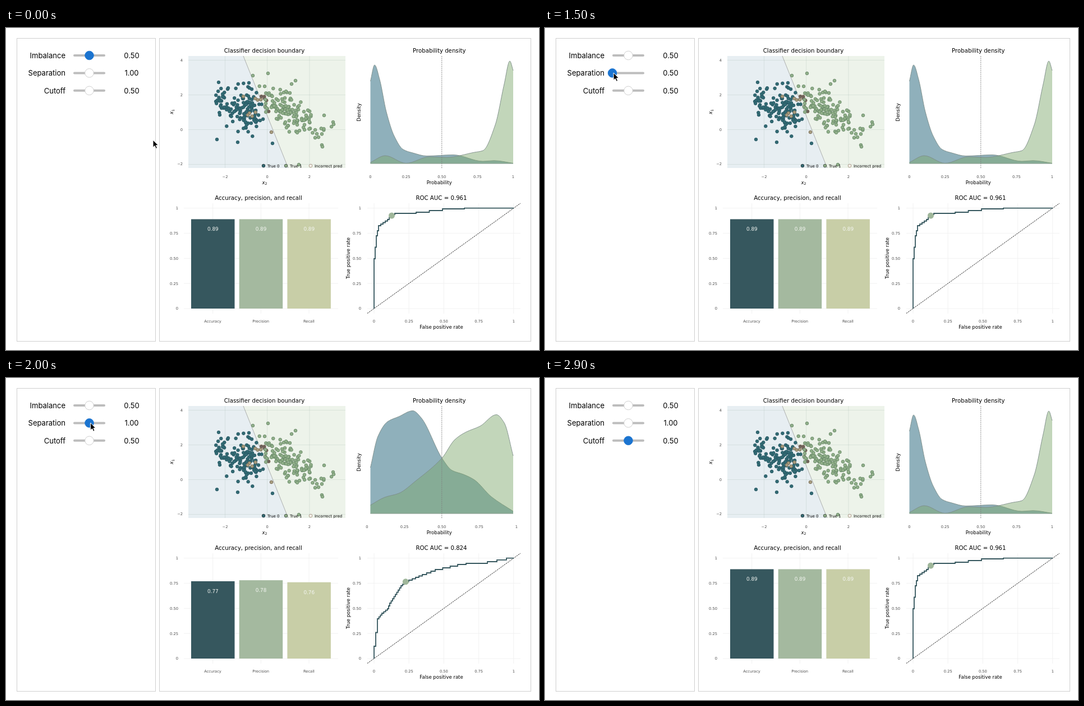
An HTML page that plays this animation: 950 px wide and 575 px high, repeating every 3000 ms.

```html
<!DOCTYPE html>
<html lang="en">
<head>
<meta charset="utf-8">
<title>Classifier explorer</title>
<style>
html, body { margin: 0; width: 100%; height: 100%; overflow: hidden; background: #fff; }
svg { display: block; font-family: "DejaVu Sans", sans-serif; }
.ui { font: 13px Inter, sans-serif; }
.title { font-size: 10.2px; }
.axis { font-size: 8.5px; }
.tick { font-size: 6.7px; fill: #4d4d4d; }
.legend { font-size: 7px; }
.value { font-size: 8.8px; fill: #f4f6f2; }
</style>
</head>
<body>
<svg id="stage" width="950" height="575" viewBox="0 0 950 575"></svg>
<script>
const stage = document.getElementById('stage');

function add(parent, tag, attrs = {}, content) {
  const el = document.createElementNS('http://www.w3.org/2000/svg', tag);
  for (const k in attrs) el.setAttribute(k, attrs[k]);
  if (content !== undefined) el.textContent = content;
  parent.append(el);
  return el;
}
const group = () => add(stage, 'g');
const text = (p, x, y, cls, s, anchor = 'middle') =>
  add(p, 'text', { x, y, class: cls, 'text-anchor': anchor }, s);
const rect = (p, x, y, width, height, fill, stroke = 'none') =>
  add(p, 'rect', { x, y, width, height, fill, stroke });
const path = (p, d, stroke, width = 1, extra = {}) =>
  add(p, 'path', { d, stroke, 'stroke-width': width, fill: 'none', ...extra });
const dot = (p, cx, cy, r, fill, stroke = 'none') =>
  add(p, 'circle', { cx, cy, r, fill, stroke, 'stroke-width': 0.9 });
const pairs = a => a.flatMap((x, i) => i % 2 ? [] : [[x, a[i + 1]]]);
const turned = (x, y, s) =>
  text(stage, 0, 0, 'axis', s).setAttribute('transform', `translate(${x} ${y}) rotate(-90)`);

// Seeded random numbers
let seed = 20;
function rand() {
  seed = (seed + 0x6D2B79F5) | 0;
  let t = Math.imul(seed ^ (seed >>> 15), 1 | seed);
  t = (t + Math.imul(t ^ (t >>> 7), 61 | t)) ^ t;
  return ((t ^ (t >>> 14)) >>> 0) / 4294967296;
}
function gauss2(limit) {
  for (;;) {
    const r = Math.sqrt(-2 * Math.log(1 - rand())), a = rand() * 2 * Math.PI;
    if (r < limit) return [r * Math.cos(a), r * Math.sin(a)];
  }
}
const cloud = (n, cx, cy, ax, ay, bx, by, limit) => Array.from({ length: n }, () => {
  const [u, v] = gauss2(limit);
  return [cx + u * ax + v * bx, cy + u * ay + v * by];
});

rect(stage, 19.5, 18.5, 247, 541, '#fff', '#cfcfcf');
rect(stage, 273.5, 18.5, 662, 541, '#fff', '#cfcfcf');

// Scatter: a few outliers, the rest from seeded clouds
const zeroEdge = pairs([379, 97, 376, 199, 433, 98, 413, 204, 475, 206]);
const zeroFar = pairs([354, 143, 459, 220, 485, 218, 530, 182, 491, 122]);
const oneFew = pairs([461, 87, 434, 152, 473, 186, 509, 100, 516, 94, 506, 116, 520, 141, 540, 163,
  567, 156, 583, 168, 584, 172, 554, 189]);
const oneEdge = pairs([467, 81, 440, 85, 563, 209, 564, 212, 551, 196, 522, 244]);
const oneShared = [...oneFew.slice(1), ...cloud(6, 558, 174, 22, 4, 0, 7, 1.4), ...cloud(9, 486, 141, 14, 4, 0, 9, 1.9)];
const zeroBase = [...zeroEdge, ...cloud(10, 380, 130, 6, 0, 0, 17, 1.6), ...cloud(130, 424, 146, 24, 4, 0, 23, 2.05)];
const zeroMany = [...zeroBase, ...zeroFar, ...cloud(122, 428, 149, 28, 4, 0, 24, 2.1)];
const oneBase = [...oneShared, ...oneEdge, ...cloud(6, 436, 139, 12, 6, 0, 20, 1.4),
  ...cloud(110, 504, 150, 29, 21, -9, 12, 2)];
const moved = (pts, dx, dy) => pts.map(([x, y]) => [x + dx, y + dy]);

function drawScatter(zeros, ones, top, bottom) {
  const g = group();
  const right = (x, y) => x > top + (bottom - top) * (y - 50) / 200;
  rect(g, 325, 50, 280, 200, '#edf3ea');
  path(g, `M325 50H${top}L${bottom} 250H325Z`, 'none', 0, { fill: '#e7eef2' });
  let grid = '';
  for (let i = 0; i < 4; i++) grid += `M325 ${57.5 + i * 62}H605`;
  for (let i = 0; i < 3; i++) grid += `M${390.5 + i * 75.2} 50V250`;
  path(g, grid, '#7f9a8e', 0.8, { opacity: 0.22 });
  path(g, `M${top} 50L${bottom} 250`, '#8c8c8c', 0.9, { 'stroke-dasharray': '1.6 .6' });
  for (const [x, y] of zeros)
    right(x, y) ? dot(g, x, y, 2.8, '#6b625d', '#7d6552') : dot(g, x, y, 2.8, '#316b73', '#2b5866');
  for (const [x, y] of ones)
    right(x, y) ? dot(g, x, y, 2.8, '#91af89', '#688a69') : dot(g, x, y, 2.8, '#a99e80', '#776a55');
  dot(g, 459, 246, 2.8, '#316b73', '#26343a');
  dot(g, 499, 246, 2.8, '#91af89', '#3f4f40');
  dot(g, 543, 246, 2.8, '#fbf8f4', '#a5917c');
  text(g, 466, 248.6, 'legend', 'True 0', 'start');
  text(g, 506, 248.6, 'legend', 'True 1', 'start');
  text(g, 550, 248.6, 'legend', 'Incorrect pred', 'start');
  return g;
}

text(stage, 460.5, 43.8, 'title', 'Classifier decision boundary');
['4', '2', '0', '−2'].forEach((s, i) => text(stage, 315, 60 + i * 61.8, 'tick', s, 'end'));
['−2', '0', '2'].forEach((s, i) => text(stage, 390.5 + i * 75.2, 267.8, 'tick', s));
function variable(x, y, sub, angle) {
  const t = add(stage, 'text', { class: 'axis', 'text-anchor': 'middle', transform: `translate(${x} ${y}) rotate(${angle})` });
  add(t, 'tspan', { 'font-style': 'italic' }, 'x');
  add(t, 'tspan', { dy: 1.6, 'font-size': 6 }, sub);
}
variable(298, 149.5, '1', -90);
variable(461, 278.5, '2', 0);

// Density outlines, joined by a monotone curve
const zeroDens = [649.5, 95, 657, 66, 666, 92, 678, 150, 692, 193, 708, 217, 725, 223, 750, 228.5,
  797, 226.5, 850, 238, 870, 236.8, 904, 241.5];
const oneDens = [649.5, 240, 676, 228, 713, 241.5, 755, 230, 785, 231, 835, 222, 850, 219, 872, 173,
  888, 100, 898, 59, 904, 76];
const zeroSpike = [650, 59, 652.3, 150, 658, 219, 667, 239, 672.5, 234, 679, 240, 904, 241.9];
const oneFlat = [650, 240.5, 710, 238, 790, 239.8, 885, 235, 904, 236];
const zeroWide = [649.5, 160, 663, 104, 680, 78, 700, 69, 725, 58.5, 740, 71, 777, 143, 795, 165,
  815, 172, 835, 182, 865, 212, 904, 238];
const oneWide = [649.5, 227, 675, 213, 700, 206, 730, 184, 777, 143, 800, 110, 820, 96.5, 845, 86,
  874, 65.5, 888, 80, 904, 139];

function smooth(pts) {
  const last = pts.length - 1;
  const chord = i => (pts[i + 1][1] - pts[i][1]) / (pts[i + 1][0] - pts[i][0]);
  const slope = i => {
    if (i === 0) return chord(0);
    if (i === last) return chord(last - 1);
    const a = chord(i - 1), b = chord(i);
    return a * b > 0 ? 2 * a * b / (a + b) : 0;
  };
  let d = 'M' + pts[0];
  for (let i = 1; i <= last; i++) {
    const [x0, y0] = pts[i - 1], [x1, y1] = pts[i], h = (x1 - x0) / 3;
    d += `C${x0 + h} ${y0 + h * slope(i - 1)} ${x1 - h} ${y1 - h * slope(i)} ${x1} ${y1}`;
  }
  return d;
}

const ticks = ['0', '0.25', '0.50', '0.75', '1'];
function drawDensity(zero, one, x0, x1, cutoff) {
  const g = group(), at = v => x0 + (x1 - x0) * v;
  [[zero, 'rgba(33,99,120,.5)'], [one, 'rgba(122,166,105,.46)']].forEach(([list, fill]) => {
    const pts = pairs(list), d = smooth(pts);
    path(g, `${d}V242H${pts[0][0]}Z`, 'none', 0, { fill });
    path(g, d, '#7d8d88', 0.9);
    path(g, `M${pts[0][0]} 242H904`, '#8fa397', 0.7);
  });
  path(g, `M${at(cutoff)} 50V250.5`, '#808080', 0.9, { 'stroke-dasharray': '2.2 1.4' });
  ticks.forEach((s, i) => text(g, at(i / 4), 267.8, 'tick', s));
  return g;
}

text(stage, 772.3, 43.8, 'title', 'Probability density');
text(stage, 772.3, 279.2, 'axis', 'Probability');
turned(631.7, 150.5, 'Density');

// Bars and ROC curve
const level = v => 501 - 179.3 * v;
text(stage, 450, 306.8, 'title', 'Accuracy, precision, and recall');
turned(612.6, 411, 'True positive rate');
text(stage, 776, 537.3, 'axis', 'False positive rate');
ticks.forEach((s, i) => {
  const y = level(i / 4), x = 656 + i * 62.2;
  path(stage, `M317 ${y}H592M644 ${y}H917M${x} 313V510`, '#f1f1f1', 0.9);
  text(stage, 307, y + 2.4, 'tick', s, 'end');
  text(stage, 633, y + 2.4, 'tick', s, 'end');
  text(stage, x, 526, 'tick', s);
});
['Accuracy', 'Precision', 'Recall'].forEach((s, i) => {
  path(stage, `M${368.7 + i * 85.7} 313V510`, '#f1f1f1', 0.9);
  text(stage, 368.5 + i * 85.7, 526, 'tick', s);
});

const rocBase = [656, 412, 660, 371, 664, 353, 680, 342, 686, 335, 693, 331, 731, 329, 778, 323, 817, 321.6];
const rocFew = [656, 408, 661, 365, 663, 352, 668, 340, 676, 334, 697, 328, 765, 321.6];
const rocNear = [656, 479, 662, 430, 670, 420, 680, 412, 684, 402, 704, 371, 712, 363.5, 742, 351,
  765, 342, 805, 333, 820, 331, 858, 328, 892, 321.6];

// Staircase through the points, long stretches split into small steps
function stairs(list) {
  let d = 'M656 501', x = 656, y = 501;
  for (const [nx, ny] of pairs(list)) {
    const n = Math.max(1, Math.round(Math.min(nx - x, y - ny) / 2.6));
    for (let i = 1; i <= n; i++) d += `H${x + (nx - x) * i / n}V${y + (ny - y) * i / n}`;
    x = nx;
    y = ny;
  }
  return d + 'H905';
}

function drawMetrics(values, auc, roc, mx, my) {
  const g = group();
  values.forEach((v, i) => {
    const x = 330 + i * 85.7, y = level(v);
    rect(g, x, y, 77.5, 501 - y, ['#36575e', '#a4b99f', '#c8cea7'][i]);
    text(g, x + 38.8, y + 21, 'value', String(v));
  });
  text(g, 776, 306.8, 'title', 'ROC AUC = ' + auc);
  path(g, 'M644 509.6L917 313', '#111', 0.9, { 'stroke-dasharray': '2.6 1.3' });
  path(g, stairs(roc), '#36575e', 1.8);
  dot(g, mx, my, 5.5, '#9fb69a');
  return g;
}

// Looks of each panel: base, imbalanced, less separated, high cutoff
const scatter = [
  drawScatter(zeroBase, oneBase, 423, 503),
  drawScatter(zeroMany, [oneFew[0], ...oneShared], 453, 544),
  drawScatter(moved(zeroBase, 18.8, 15.5), moved(oneBase, -18.8, 15.5), 415, 500),
  drawScatter(zeroBase, oneBase, 447, 527)
];
const density = [
  drawDensity(zeroDens, oneDens, 649.5, 904, 0.5),
  drawDensity(zeroSpike, oneFlat, 650, 906, 0.5),
  drawDensity(zeroWide, oneWide, 643.5, 910, 0.5),
  drawDensity(zeroDens, oneDens, 649.5, 904, 0.9)
];
const metrics = [
  drawMetrics([0.89, 0.89, 0.89], '0.961', rocBase, 687.5, 335),
  drawMetrics([0.96, 0.9, 0.66], '0.97', rocFew, 667.3, 340.3),
  drawMetrics([0.77, 0.78, 0.76], '0.824', rocNear, 712.3, 363.8),
  drawMetrics([0.86, 0.98, 0.73], '0.961', rocBase, 660.5, 370)
];

// Sliders: name, low end, middle
const sliders = [['Imbalance', 0.1, 0.5], ['Separation', 0.5, 1], ['Cutoff', 0.1, 0.5]].map(([name, low, mid], i) => {
  const y = 49 + i * 31.4;
  text(stage, 106, y + 4.7, 'ui', name, 'end');
  path(stage, `M122 ${y}H175`, '#bdbdbd', 4, { 'stroke-linecap': 'round' });
  const thumb = dot(stage, 148.5, y, 7.8, '#fff'), label = text(stage, 224, y + 4.7, 'ui', '');
  return (active, value) => {
    const v = active ? value : mid, x = 148.5 + 28.4 * (v - mid) / (mid - low);
    thumb.setAttribute('cx', x);
    thumb.setAttribute('fill', active ? '#1b74d0' : '#fff');
    thumb.setAttribute('stroke', active ? '#1b74d0' : '#cacaca');
    label.textContent = v.toFixed(2);
    return x;
  };
});

const cursor = path(stage, 'M0 0V13.2L3.1 10.4L5.2 15.3L7.5 14.3L5.4 9.6H9.4Z', '#fff', 1,
  { fill: '#000', 'stroke-linejoin': 'round' });

// Drag: time, slider, value. Each panel follows with its own delay: time, look
const drag = [[0, 0, 0.5], [180, 0, 0.9], [1100, 0, 0.5], [1400, 1, 1], [1500, 1, 0.5], [1900, 1, 1],
  [2200, 2, 0.5], [2300, 2, 0.9], [2600, 2, 0.5]];
const scatterAt = [[0, 0], [800, 1], [1200, 0], [1600, 2], [2000, 0], [2400, 3], [2700, 0]];
const densityAt = [[0, 0], [900, 1], [1300, 0], [1700, 2], [2100, 0], [2500, 3], [2800, 0]];
const metricsAt = [[0, 0], [1000, 1], [1300, 0], [1800, 2], [2100, 0], [2500, 3], [2800, 0]];
const current = (table, t) => table.findLast(row => row[0] <= t);
const show = (looks, k) => looks.forEach((g, i) => g.setAttribute('display', i === k ? 'inline' : 'none'));

function render(t) {
  show(scatter, current(scatterAt, t)[1]);
  show(density, current(densityAt, t)[1]);
  show(metrics, current(metricsAt, t)[1]);
  const [, active, value] = current(drag, t);
  const xs = sliders.map((set, i) => set(i === active, value));
  const [x, y] = t < 100 ? [262, 200] : [xs[active] + 2, [51, 80, 112][active]];
  cursor.setAttribute('transform', `translate(${x} ${y})`);
  cursor.setAttribute('display', t < 2900 ? 'inline' : 'none');
}

const start = performance.now();
function tick() {
  render((performance.now() - start) % 3000);
  requestAnimationFrame(tick);
}
tick();
</script>
</body>
</html>
```
